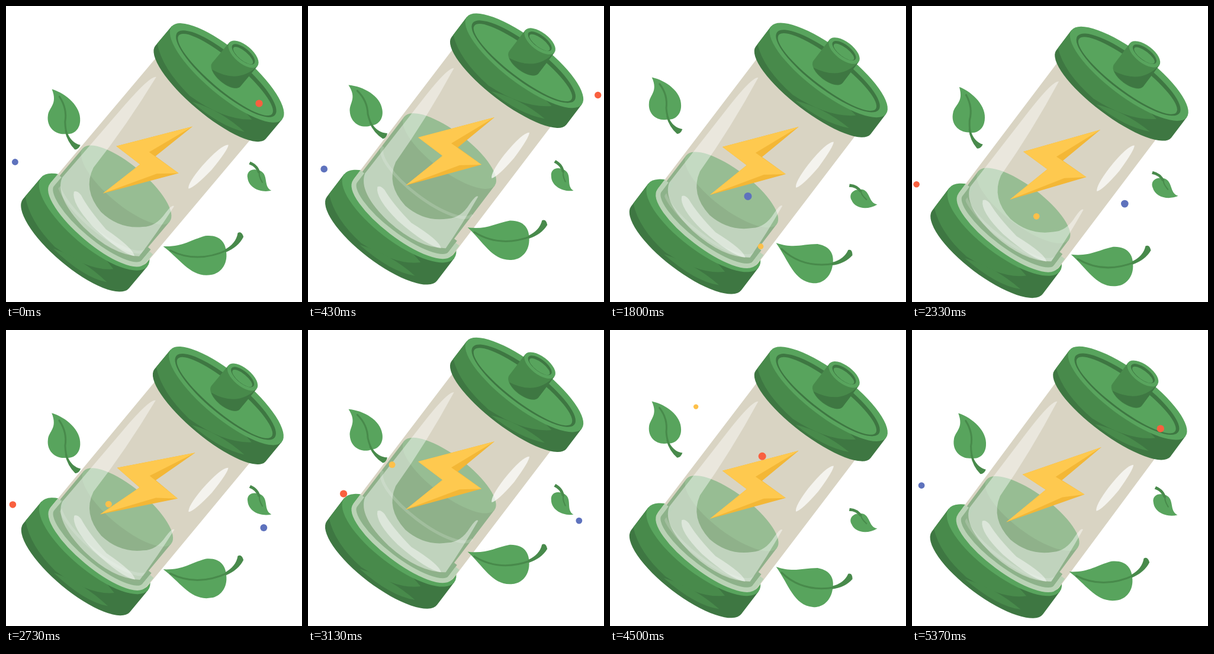
Write an HTML page that moves like this. It is 500 px wide and 500 px high and loops after 5410 ms.

```html
<!DOCTYPE html>
<html lang="en">
<head>
<meta charset="utf-8">
<title>Green battery</title>
<style>
html, body { margin: 0; width: 100%; height: 100%; overflow: hidden; background: #fff }
svg { display: block; width: 100vw; height: 100vh }
.light { fill: #58a45d }
.mid { fill: #488a4b }
.dark { fill: #3e7742 }
.line { fill: none; stroke: #488a4b; stroke-width: 3; stroke-linecap: round }
.shine { fill: #fff; opacity: .43 }
</style>
</head>
<body>
<svg viewBox="0 0 500 500">
  <g id="back"></g>
  <g id="leaf0">
    <path class="light" d="M71 121C95 126 121 145 120 168C120 184 108 192 98 191C80 195 64 183 66 164C67 150 82 145 71 121Z"/>
    <path class="line" d="M84 132Q98 150 95 172Q96 186 100 194"/>
    <path class="mid" d="M95 186Q100 204 113 215Q119 215 122 207Q106 205 98 186Z"/>
  </g>
  <g id="battery">
    <g transform="translate(250 260) rotate(37.5)">
      <!-- lower cap -->
      <path class="dark" d="M-123 144V192A117 39 0 0 0 111 192V144Z"/>
      <path class="mid" d="M-123 144V186Q-90 214 -30 219Q40 214 70 184Z"/>
      <path class="mid" d="M-30 223Q20 204 76 208Q40 228 -30 223Z"/>
      <ellipse class="light" cx="-6" cy="144" rx="117" ry="42"/>
      <!-- glass and liquid -->
      <path fill="#d9d4c3" d="M-105 -150V140A105.500 32 0 0 0 106 140V-150Z"/>
      <path id="body" fill="#8fb18a"/>
      <ellipse id="surface" cx="-5" rx="96" ry="33" fill="#97bd93"/>
      <path id="ripple" fill="none" stroke="#fff" stroke-width="5" opacity=".16"/>
      <path fill="none" stroke="#8db28a" stroke-width="8" d="M-93 118V142A93 26 0 0 0 93 142V118"/>
      <path fill="none" stroke="#b9d2b5" stroke-width="8" d="M-101 122V142A101 31 0 0 0 101 142V122"/>
    </g>
    <path class="shine" d="M251 121Q241 119 200 171L100 298Q88 330 140 380Q190 425 236 425Q264 385 291 338Q288 334 277 350Q262 374 240 375Q200 381 168 353Q135 317 152 279Q205 205 251 121Z"/>
    <path class="shine" d="M121 321Q117 340 155 378Q205 422 228 425Q226 412 178 382Q147 350 133 326Q126 318 121 321Z"/>
    <path class="shine" style="opacity:.72" d="M378 230Q366 230 335 268Q312 298 314 307Q324 305 352 273Q378 238 378 230Z"/>
    <g transform="translate(250 260) rotate(37.5)">
      <!-- lid -->
      <path class="dark" d="M-119 -193V-150A122 36 0 0 0 125 -150V-193Z"/>
      <path class="mid" d="M-119 -193V-155Q-86 -128 -20 -123Q50 -128 86 -160Z"/>
      <path class="mid" d="M-10 -118Q35 -138 90 -136Q50 -116 -10 -118Z"/>
      <ellipse class="light" cx="3" cy="-193" rx="122" ry="38"/>
      <ellipse class="dark" cx="3" cy="-191" rx="108" ry="30"/>
      <ellipse class="light" cx="3" cy="-189" rx="103" ry="25"/>
      <!-- knob -->
      <path class="mid" d="M-27 -235V-190A31 15 0 0 0 35 -190V-235Z"/>
      <path class="dark" d="M-20 -181A31 15 0 0 0 35 -190V-235Q30 -190 -20 -181Z"/>
      <ellipse class="light" cx="4" cy="-235" rx="31" ry="15"/>
      <ellipse class="dark" cx="4" cy="-235" rx="24" ry="10"/>
      <ellipse class="light" cx="5" cy="-233" rx="21" ry="7.500"/>
    </g>
  </g>
  <g id="bolt">
    <path fill="#f3b736" d="M319 204L190 238L231 269L169 319L297 284L257 255Z"/>
    <path fill="#fec94f" d="M319 204L190 238L231 269L169 319L260 285L297 284L246 248Z"/>
  </g>
  <g id="leaf1">
    <path class="light" d="M281 400C310 410 325 402 350 402C373 406 378 422 375 437C372 460 355 470 342 468C310 465 302 430 281 400Z"/>
    <path class="line" d="M290 410Q325 444 378 435"/>
    <path class="mid" d="M374 433Q394 428 401 412Q408 410 408 421Q396 435 374 438Z"/>
  </g>
  <g id="leaf2">
    <path class="light" d="M451 335C436 333 440 312 425 310C410 309 403 319 408 328C414 343 435 345 451 335Z"/>
    <path class="line" style="stroke-width:2" d="M433 327Q423 318 424 312"/>
    <path class="mid" d="M426 314Q420 302 405 301L404 306Q416 306 422 315Z"/>
  </g>
  <g id="front"></g>
</svg>
<script>
const LOOP = 5410, HALF = LOOP / 2, TURN = 2 * Math.PI;
const { sin, cos, max, min } = Math;
const $ = id => document.getElementById(id);
const move = (id, s) => $(id).setAttribute('transform', s);
const clamp = v => max(0, min(1, v));

// Everything but the dots swings twice per loop
const swing = (t, mean, size, peak) => mean + size * cos(TURN * (t - peak) / HALF);

// Swing each leaf about the middle of its drawn shape
function leaf(i, hx, hy, x, y, angle, stretch) {
  move('leaf' + i, `translate(${x} ${y}) rotate(${angle}) scale(${stretch} 1)
    rotate(${-swing.rest[i]}) translate(${-hx} ${-hy})`);
}
swing.rest = [62.4, 6.5, 36.3];

// Tilted orbits: centre, long axis, short axis; the angle lags behind an even turn
const dots = [
  { color: '#5e72bd', start: 0, lag: .28, lean: -.66, r: 5.5, mid: [237, 295], long: [-222, -30], short: [0, 27] },
  { color: '#f9603f', start: 2480, lag: .51, lean: .31, r: 5.5, mid: [248, 226], long: [-247, 75], short: [0, -10] },
  { color: '#fdc04a', start: 1535, lag: 0, lean: 0, r: 4.5, mid: [200, 268], long: [70, 145], short: [-40, 0] }
];
for (const d of dots) {
  d.el = document.createElementNS('http://www.w3.org/2000/svg', 'circle');
  d.el.setAttribute('fill', d.color);
}

function orbit(d, t) {
  const turn = TURN * (t - d.start) / LOOP;
  const a = turn - d.lag * (1 - cos(turn - d.lean));
  const [x, y] = d.mid.map((m, i) => m + d.long[i] * cos(a) + d.short[i] * sin(a));
  const layer = $(sin(a) > 0 ? 'front' : 'back');
  if (d.el.parentNode !== layer) layer.append(d.el);
  d.el.setAttribute('cx', x);
  d.el.setAttribute('cy', y);
  d.el.setAttribute('r', d.r + sin(a));
}

function draw(t) {
  const p = t % HALF, q = p > HALF / 2 ? p - HALF : p;

  // short tremble around the start of each half
  const strength = clamp((q + 400) / 100) * clamp((250 - q) / 150);
  const phase = q / 33.4 * TURN / 5;
  const shake = (m, a, b) => strength * (m + a * cos(phase) + b * sin(phase));

  const x = swing(p, -2, 2, 1658), y = swing(p, -8.2, 15.1, -475);
  move('battery', `translate(${x} ${y}) rotate(${shake(0, 2.8, 1) - .2} 250 260)`);

  const bx = 243.5 + x + shake(-1, 0, 0), by = 261.5 + y;
  move('bolt', `translate(${bx} ${by}) rotate(${shake(3, -2.4, 3.5) - 37.5})
    scale(${1 + shake(.067, -.067, -.021)} ${1 + shake(-.081, .061, .026)})
    rotate(37.5) translate(-243.5 -261.5)`);

  const level = swing(p, 35, 59, -475), low = min(level + 62, 128);
  $('body').setAttribute('d', `M-101 ${level}V140A96 26 0 0 0 91 140V${level}Z`);
  $('surface').setAttribute('cy', level);
  $('ripple').setAttribute('d', `M-99 ${low}A95 30 0 0 0 91 ${low}`);

  const stretch = swing(p, 1.03, .03, 0);
  leaf(0, 94.5, 166, swing(p, 97, 2.9, 220), swing(p, 171, 19.3, -120), swing(p, 58, 12.6, -382), stretch);
  leaf(1, 343, 407.5, swing(p, 339.3, -8.3, 0), swing(p, 388, 28.2, -559), swing(p, 1, -10.4, 0), stretch);
  leaf(2, 428.5, 319.5, swing(p, 431, 3, 735), swing(p, 303.7, 17.6, 1600), swing(p, 48, 11.6, 447), stretch);

  for (const d of dots) orbit(d, t);
}

function tick() {
  draw(performance.now() % LOOP);
  requestAnimationFrame(tick);
}
tick();
</script>
</body>
</html>
```
